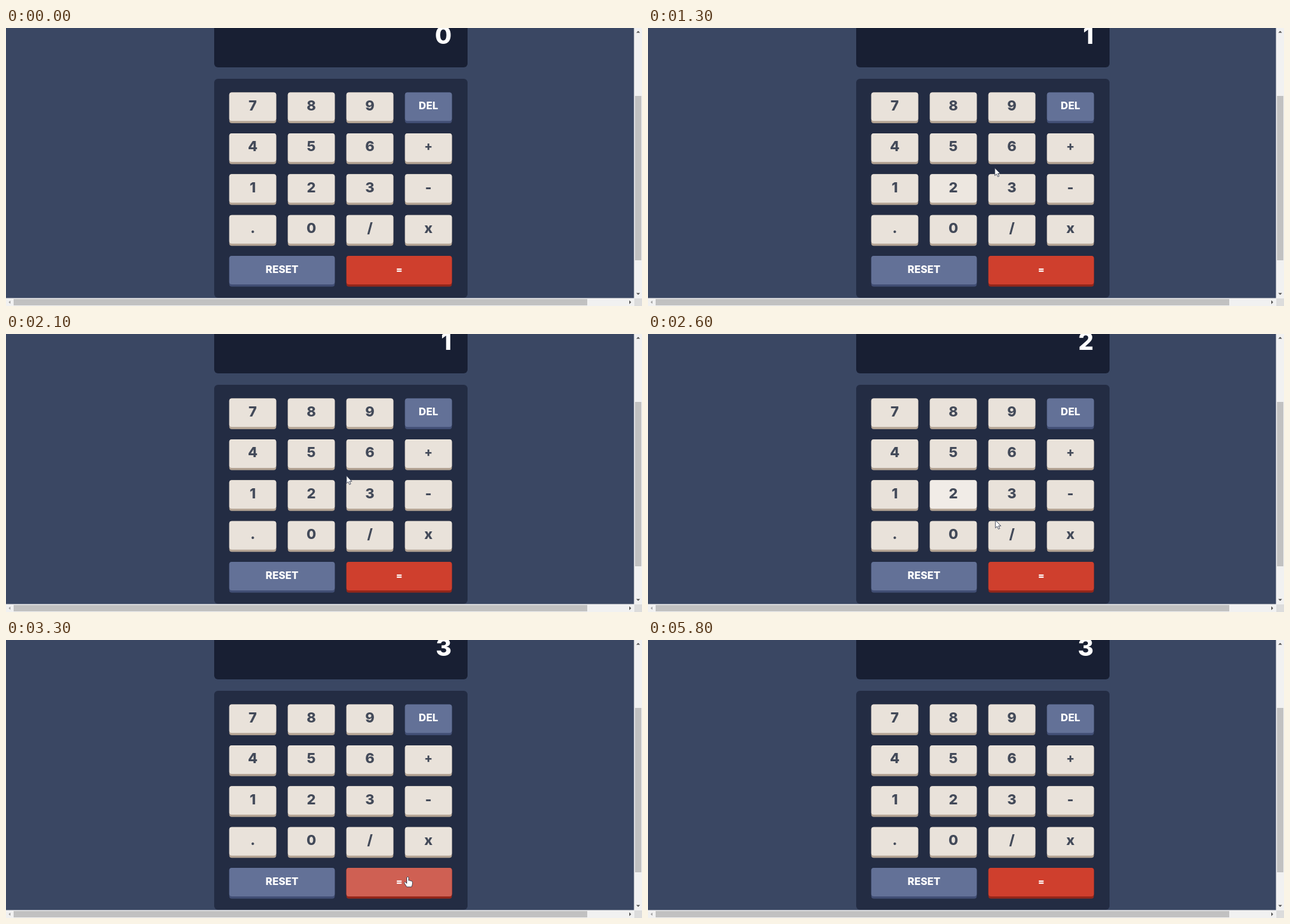
Recreate the animation shown at these times as an HTML page. Size 999 px wide and 438 px high, loop 6100 ms.

```html
<!DOCTYPE html>
<html lang="en">
<head>
<meta charset="utf-8">
<title>Calculator</title>
<style>
html, body { margin: 0; width: 100%; height: 100%; overflow: hidden; background: #3a4763; }
svg { display: block; width: 999px; height: 438px; }
text { font: 800 22px Inter, Lato, sans-serif; text-anchor: middle; }
</style>
</head>
<body>
<svg viewBox="0 0 999 438">
  <rect width="999" height="438" fill="#3a4763"/>
  <rect x="327" y="-40" width="398" height="102" rx="6" fill="#181f33"/>
  <text id="screen" x="700" y="24.5" fill="#fff" style="font-size:38px;text-anchor:end"></text>
  <rect x="327" y="80" width="398" height="345" rx="6" fill="#232c43"/>
  <g id="keys"></g>
  <path d="M986.400 0H999v438H0V425.400h986.400z" fill="#f1f1f1"/>
  <path d="M987 426h12v12h-12z" fill="#dcdcdc"/>
  <path d="M988 107h10v259h-10zM12 427h901v10H12z" fill="#c1c1c1"/>
  <path id="hot" d="M987 0h12v11h-12z" fill="#d2d2d2"/>
  <path d="M990 7.500l3-3 3 3zM990 417.500l3 3 3-3zM979 429l3 3-3 3z" fill="#505050"/>
  <path d="M7 429.500l-3 2.500 3 2.500z" fill="#a3a3a3"/>
  <g id="cursor" stroke="#222b40" stroke-width=".8" stroke-linejoin="round" fill="#fff">
    <path id="arrow" d="M.5 .5V12.500L3.200 10 5.200 14.300 7.200 13.400 5.300 9.300H9z"/>
    <path id="hand" d="M-1.500 1Q0-.8 1.500 1V6Q3 5 3.800 6.400 5.300 5.600 5.900 7 7.300 6.600 7.500 8.500V11Q7 13.500 6 16H-1.500Q-3.500 13-5.500 9.500-4.800 7.500-3 9L-1.500 10.500z"/>
  </g>
</svg>
<script>
const LOOP = 6100, STEP = 100, FADE = 150, SAMPLES = 6;
const $ = id => document.getElementById(id);
const show = (id, on) => $(id).style.display = on ? '' : 'none';

const cream = { face: '#e9e2da', edge: '#b3a393', ink: '#434a59', hover: '#fff' };
const blue = { face: '#637197', edge: '#414e74', ink: '#fff', hover: '#a2b3e1' };
const red = { face: '#cf3f2d', edge: '#93261a', ink: '#fff', hover: '#cf6053' };
const themes = { DEL: blue, RESET: blue, '=': red };
const sizes = { DEL: 16, RESET: 16, '+': 19, '=': 15 };

function add(tag, attrs, label = '') {
  const el = document.createElementNS('http://www.w3.org/2000/svg', tag);
  for (const name in attrs) el.setAttribute(name, attrs[name]);
  el.textContent = label;
  $('keys').append(el);
  return el;
}

function makeKey(label, col, row, span) {
  const x = 350.7 + col * 92, y = 101.5 + row * 64.4, w = span * 92 - 18.3;
  const { face, edge, ink, hover } = themes[label] || cream;
  const size = sizes[label] || 22;
  const plate = (height, fill, opacity = 1) =>
    add('rect', { x, y, width: w, height, rx: 4, fill, opacity });
  plate(48.5, edge);
  plate(45, face);
  const glow = plate(45, hover, 0);
  add('text', { x: x + w / 2, y: y + 22.8 + size / 4, fill: ink, style: `font-size:${size}px` }, label);
  return { glow, has: p => p && p.x > x && p.x < x + w && p.y > y && p.y < y + 48.5 };
}

// Each row shares four columns evenly among its keys
const keys = ['7 8 9 DEL', '4 5 6 +', '1 2 3 -', '. 0 / x', 'RESET ='].flatMap((line, row) => {
  const labels = line.split(' '), span = 4 / labels.length;
  return labels.map((label, i) => makeKey(label, i * span, row, span));
});

// Places where the pointer rests; it travels straight between them
const stops = [
  { from: 100, to: 100, x: 560, y: 410 },
  { from: 700, to: 900, x: 390, y: 260 },
  { from: 1600, to: 1600, x: 660, y: 190 },
  { from: 2300, to: 2400, x: 484, y: 236 },
  { from: 2880, to: 3400, x: 631, y: 373 },
  { from: 3800, to: 5799, x: 995, y: -1 }
];

function pointer(t) {
  const i = stops.findIndex(s => t <= s.to);
  if (i < 0 || t < stops[0].from) return null;
  const b = stops[i], a = stops[i - 1] || b;
  const k = t >= b.from ? 1 : (t - a.to) / (b.from - a.to);
  return { x: a.x + (b.x - a.x) * k, y: a.y + (b.y - a.y) * k };
}

// Share of the last moments that the pointer spent on the key
function hoverLevel(key, t) {
  let n = 0;
  for (let i = 0; i < SAMPLES; i++) n += key.has(pointer(t - i * FADE / SAMPLES)) ? 1 : 0;
  return n / SAMPLES;
}

function draw() {
  const t = Math.floor(performance.now() % LOOP / STEP) * STEP;
  const p = pointer(t), onKey = keys.some(key => key.has(p));
  $('screen').textContent = [700, 2300, 3200].filter(click => t >= click).length;
  keys.forEach(key => key.glow.setAttribute('opacity', hoverLevel(key, t)));
  if (p) $('cursor').setAttribute('transform', `translate(${p.x} ${p.y})`);
  show('cursor', p);
  show('hand', onKey);
  show('arrow', !onKey);
  show('hot', p && p.x > 987 && p.y < 11);
  requestAnimationFrame(draw);
}
draw();
</script>
</body>
</html>
```
